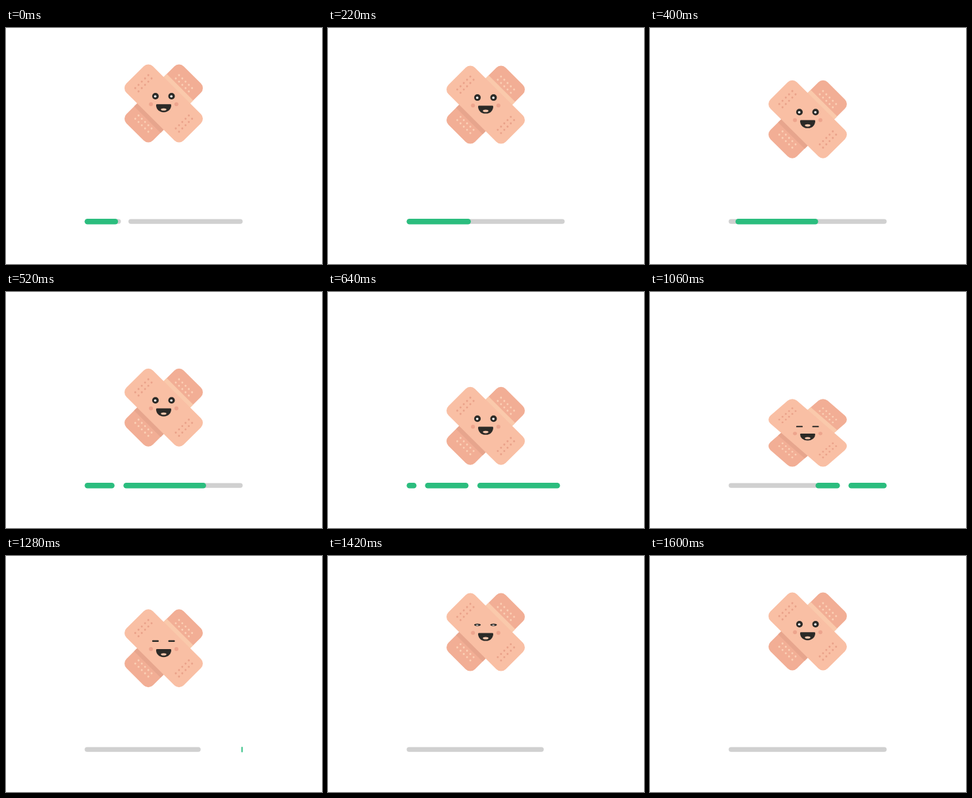
Animation of 480 by 360 pixels, one loop 1620 ms. Source, as an HTML page with a canvas:

```html
<!DOCTYPE html>
<html lang="en">
<head>
<meta charset="utf-8">
<title>Bouncing plaster</title>
<style>
html, body { margin: 0; height: 100%; overflow: hidden; background: #fff; }
canvas { display: block; }
</style>
</head>
<body>
<canvas id="stage" width="480" height="360"></canvas>
<script>
const ctx = document.getElementById('stage').getContext('2d');
const LOOP = 1620, DROP = 103, FLOOR = 151.5, HALF = 59.5;
const LEFT = 119.5, RIGHT = 359.5;
const GREEN = '#2bbd7e', GREY = '#d0d0d0', DARK = '#2b2a27';

const ramp = (t, a, b) => Math.min(1, Math.max(0, (t - a) / (b - a)));
const easeInOut = u => u < 0.5 ? 4 * u ** 3 : 1 - 4 * (1 - u) ** 3;

// Piecewise linear value through [time, value] points
function track(t, points) {
  let value = points[0][1];
  for (let i = 1; i < points.length; i++) {
    const [t0, v0] = points[i - 1], [t1, v1] = points[i];
    value += (v1 - v0) * ramp(t, t0, t1);
  }
  return value;
}

function rounded(x, y, w, h, r, color) {
  ctx.fillStyle = color;
  ctx.beginPath();
  ctx.roundRect(x, y, w, h, r);
  ctx.fill();
}

function oval(x, y, rx, ry, color) {
  ctx.fillStyle = color;
  ctx.beginPath();
  ctx.ellipse(x, y, rx, ry, 0, 0, 2 * Math.PI);
  ctx.fill();
}

function strip(angle, color, dotColor, bands) {
  ctx.save();
  ctx.rotate(angle);
  rounded(-61.5, -28.5, 123, 57, 10, color);
  for (const x of [-47, -40, 40, 47])
    for (let y = -14; y <= 14; y += 7) oval(x, y, 1.5, 1.5, dotColor);
  ctx.restore();
}

// Light and shade the front strip casts on the back one
function edges() {
  ctx.save();
  ctx.rotate(Math.PI / 4);
  rounded(-28.5, -35, 57, 8, 0, '#fac9ab');
  rounded(-28.5, 27, 57, 8, 0, '#e7a58d');
  ctx.restore();
}

function face(open) {
  for (const x of [-12.5, 12]) {
    if (open > 0.25) {
      oval(x, -11, 5, 5 * open, DARK);
      oval(x - 0.3, -10.7, 1.8, 1.8 * open, '#fff');
    } else {
      rounded(x - 5, -12.2, 10, 2.4, 1, DARK);
    }
  }
  oval(-19.3, 1.2, 3, 3, '#eda48d');
  oval(19.3, 1.2, 3, 3, '#eda48d');
  rounded(-11.5, 1.3, 23, 12.2, [1.5, 1.5, 11, 11], DARK);
  oval(0, 9.3, 4.2, 1.8, '#f6c6ac');
}

function plaster(t) {
  const drop = DROP * (easeInOut(ramp(t, 78, 908)) - easeInOut(ramp(t, 954, 1496)));
  const squash = Math.min(1, (FLOOR - drop) / HALF);
  ctx.save();
  ctx.translate(239.5, 115 + drop);
  ctx.scale(1, squash);
  strip(-Math.PI / 4, '#f2ae95', '#fbcfb4');
  edges();
  strip(Math.PI / 4, '#f9bfa4', '#eaa28a');
  face(1 - ramp(t, 900, 960) + ramp(t, 1400, 1460));
  ctx.restore();
}

function pill(from, to, y, h, color) {
  const a = Math.max(LEFT, from), b = Math.min(RIGHT, to);
  if (b - a > 1) rounded(a, y, b - a, h, h / 2, color);
}

function bar(t) {
  const grey = (a, b) => pill(a, b, 291.5, 7.2, GREY);
  const green = (a, b) => pill(a, b, 291, 8.5, GREEN);
  const head = track(t, [[0, 170], [400, 255], [640, 352], [820, 426], [1060, 506], [1280, 612], [1400, 680]]);
  const tail = head - 255;

  if (t < 440) {
    grey(LEFT, 174.5);
    grey(186, RIGHT);
  } else if (t < 600) {
    grey(head - 8, RIGHT);
  }
  grey(LEFT, Math.min(tail + 3, track(t, [[1060, 255], [1280, 295.5], [1560, RIGHT]])));

  if (t >= 1600) return;
  green(head - 125.5, head);
  green(head - 205, head - 139);
  green(tail, head - 218);
}

function frame(now) {
  const t = now % LOOP;
  ctx.clearRect(0, 0, 480, 360);
  plaster(t);
  bar(t);
  requestAnimationFrame(frame);
}
requestAnimationFrame(frame);
</script>
</body>
</html>
```
